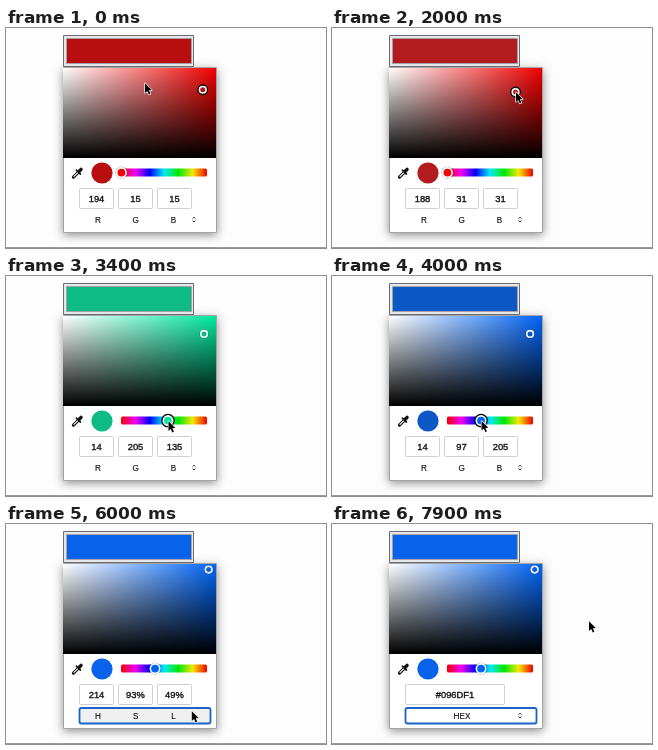
Write an HTML page with a canvas that moves like this. It is 320 by 220 pixels and loops after 8000 ms.

```html
<!DOCTYPE html>
<html lang="en">
<head>
<meta charset="utf-8">
<title>Colour picker</title>
<style>
html, body { margin: 0; width: 100%; height: 100%; overflow: hidden; background: #fdfdfd; }
canvas { display: block; width: 320px; height: 220px; }
</style>
</head>
<body>
<canvas id="stage" width="320" height="220"></canvas>
<script>
const ctx = document.getElementById('stage').getContext('2d');
const LOOP = 8000, STEP = 100;
const FONT = '"Liberation Sans", Arial, sans-serif';
const INK = '#111';
const AREA = { x: 57, y: 40, w: 153, h: 90 };
const BAR = { x: 115, y: 140.5, w: 86, h: 8 };
const SPOT = { x: 60.2, y: 40.7, w: 148, h: 88 };
const KNOB = { x: 115.4, y: 144.6, w: 83 };
const RED_HUE = 360, BLUE_HUE = 214.08;

// A colour's place in the shade area, from its highest and lowest channel
const spot = (max, min) => [SPOT.x + SPOT.w * (1 - min / max), SPOT.y + SPOT.h * (1 - max / 255)];
const hueToX = h => KNOB.x + KNOB.w * (1 - h / 360);
const xToHue = x => 360 * (1 - (x - KNOB.x) / KNOB.w);

const start = [138.5, 55], red = spot(194, 15), dull = spot(124, 65);
const deep = spot(205, 14), bright = spot(241, 9);
const onBar = [138.3, 144.6], blue = [hueToX(BLUE_HUE), 144.6];
const menu = [185.3, 187], rest = [256.5, 97];

// Pointer path: [time, point]
const path = [
  [0, start], [300, start], [1300, dull], [2300, deep], [2400, deep],
  [2800, onBar], [2900, onBar], [3400, [162, 145]], [3900, blue], [4100, blue],
  [4500, [221, 56]], [4900, bright], [5200, [151, 154]],
  [5700, menu], [6800, menu], [7400, [273, 140]], [7900, rest]
];

function pointerAt(t) {
  const i = path.findIndex(([time]) => time > t);
  if (i < 0) return rest;
  const [t0, a] = path[i - 1], [t1, b] = path[i];
  const u = (t - t0) / (t1 - t0);
  const e = u * u * (3 - 2 * u);
  return a.map((v, j) => v + (b[j] - v) * e);
}

// The ring and the hue knob follow the pointer while it is held down
function ringAt(t) {
  if (t < 100) return red;
  return pointerAt(t < 4700 ? Math.min(t, 2300) : Math.min(t, 4900));
}
const hueAt = t => t < 2900 ? RED_HUE : xToHue(pointerAt(Math.min(t, 3900))[0]);

function hsv(h, s, v) {
  return [5, 3, 1].map(n => {
    const k = (n + h / 60) % 6;
    return Math.round(255 * v * (1 - s * Math.max(0, Math.min(k, 4 - k, 1))));
  });
}

// The screen shows colours a little duller than their values
const shown = ([r, g, b]) => `rgb(${r * 0.95},${g * 0.91},${b * 0.97})`;
const pure = h => shown(hsv(h, 1, 1));

function hsl([r, g, b], h) {
  const max = Math.max(r, g, b), min = Math.min(r, g, b), sum = max + min;
  const sat = (max - min) / (sum > 255 ? 510 - sum : sum || 1);
  return [Math.round(h % 360), Math.round(sat * 100) + '%', Math.round(sum / 5.1) + '%'];
}
const hex = c => '#' + c.map(n => n.toString(16).padStart(2, '0')).join('').toUpperCase();

function rect(x, y, w, h, fill) {
  ctx.fillStyle = fill;
  ctx.fillRect(x, y, w, h);
}

function frame(x, y, w, h, r, fill, line, width = 1) {
  ctx.beginPath();
  ctx.roundRect(x, y, w, h, r);
  ctx.fillStyle = fill;
  ctx.fill();
  ctx.strokeStyle = line;
  ctx.lineWidth = width;
  ctx.stroke();
}

function disc(x, y, r, fill) {
  ctx.beginPath();
  ctx.arc(x, y, r, 0, 2 * Math.PI);
  ctx.fillStyle = fill;
  ctx.fill();
}

function stroke(points, color, width) {
  ctx.beginPath();
  points.forEach(([x, y]) => ctx.lineTo(x, y));
  ctx.strokeStyle = color;
  ctx.lineWidth = width;
  ctx.stroke();
}

function label(text, x, y, size, weight) {
  ctx.font = `${size}px ${FONT}`;
  ctx.textAlign = 'center';
  ctx.fillStyle = ctx.strokeStyle = INK;
  ctx.lineWidth = weight;
  ctx.fillText(text, x, y);
  ctx.strokeText(text, x, y);
}
const valueText = (text, x) => label(text, x, 174, 9.4, 0.35);
const modeText = (text, x) => label(text, x, 194.6, 8.2, 0.12);

function gradient(x0, y0, x1, y1, stops) {
  const g = ctx.createLinearGradient(x0, y0, x1, y1);
  stops.forEach((c, i) => g.addColorStop(i / (stops.length - 1), c));
  return g;
}

function handle(x, y, r, fill, focused) {
  if (focused) disc(x, y, r + 1.3, '#000');
  else disc(x, y, r + 0.6, 'rgba(0,0,0,0.25)');
  disc(x, y, r, '#fff');
  disc(x, y, r - 1.6, fill);
}

function swatchButton(color) {
  frame(57.5, 7.5, 130, 31, 0, '#e6e6e9', '#6c6c74');
  frame(60.5, 10.5, 125, 25, 0, color, '#a2a2a7');
}

function popup() {
  ctx.save();
  ctx.shadowColor = 'rgba(0,0,0,0.45)';
  ctx.shadowBlur = 9;
  ctx.shadowOffsetY = 2;
  rect(57, 40, 154, 165, '#fff');
  ctx.restore();
  frame(57.5, 39.5, 153, 165, 0, '#fff', '#a4a4a4');
}

function shades(h) {
  const { x, y, w, h: height } = AREA;
  rect(x, y, w, height, gradient(x, 0, x + w, 0, ['#fff', pure(h)]));
  rect(x, y, w, height, gradient(0, y, 0, y + height, ['rgba(0,0,0,0)', '#000']));
}

function hueBar() {
  const stops = Array.from({ length: 7 }, (_, i) => pure(360 - 60 * i));
  ctx.beginPath();
  ctx.roundRect(BAR.x, BAR.y, BAR.w, BAR.h, 1.5);
  ctx.fillStyle = gradient(BAR.x, 0, BAR.x + BAR.w, 0, stops);
  ctx.fill();
}

function dropper() {
  ctx.save();
  ctx.translate(71, 145.5);
  ctx.rotate(-Math.PI / 4);
  ctx.lineCap = 'round';
  stroke([[-5, 0], [2, 0]], INK, 3.2);
  stroke([[-4.2, 0], [1.5, 0]], '#fff', 1.1);
  stroke([[2, -2.8], [2, 2.8]], INK, 1.6);
  stroke([[3.2, 0], [5.8, 0]], INK, 3.4);
  ctx.restore();
}

function field(x, w, text) {
  frame(x, 160.5, w, 20, 1, '#fff', '#d0d0d0');
  valueText(text, x + w / 2);
}

function fields(mode, color, h) {
  if (mode === 'HEX') return field(73.5, 99, hex(color));
  const values = mode === 'RGB' ? color : hsl(color, h);
  values.forEach((v, i) => field(73.5 + 39 * i, 34, v));
}

function modeRow(mode, focused, hover) {
  if (focused) frame(73.5, 184, 131, 15.5, 2, hover ? '#f0f0f0' : '#fff', '#1b62c9', 1.8);
  if (mode === 'HEX') modeText(mode, 130);
  else [...mode].forEach((c, i) => modeText(c, 92 + 37.8 * i));
  for (const dir of [-1, 1]) {
    const y = 191.6 + dir;
    stroke([[186.7, y], [188, y + 1.4 * dir], [189.3, y]], '#222', 1);
  }
}

function pointer(x, y) {
  ctx.save();
  ctx.translate(x + 0.5, y + 0.3);
  ctx.lineJoin = 'round';
  const arrow = new Path2D('M0 0V9.6L2.2 7.6L3.8 11.2L5.4 10.5L3.9 7L6.8 6.8Z');
  ctx.strokeStyle = '#fff';
  ctx.lineWidth = 1.3;
  ctx.stroke(arrow);
  ctx.fillStyle = '#000';
  ctx.fill(arrow);
  ctx.restore();
}

function draw(t) {
  const [rx, ry] = ringAt(t);
  const h = hueAt(t);
  const [px, py] = pointerAt(t);
  const color = hsv(h, (rx - SPOT.x) / SPOT.w, 1 - (ry - SPOT.y) / SPOT.h);
  const mode = t < 5800 ? 'RGB' : t < 6700 ? 'HSL' : 'HEX';
  const focus = t < 2900 ? 'shade' : t < 4700 ? 'hue' : t < 5800 ? 'shade' : 'mode';
  const hover = px > 73 && px < 205 && py > 184 && py < 200;

  rect(0, 0, 320, 220, '#fdfdfd');
  rect(0, 219, 320, 1, '#999');
  popup();
  swatchButton(shown(color));
  shades(h);
  handle(rx, ry, 4.1, shown(color), focus === 'shade');
  dropper();
  disc(96, 145, 10.6, shown(color));
  hueBar();
  handle(hueToX(h), KNOB.y, 5.5, pure(h), focus === 'hue');
  fields(mode, color, h);
  modeRow(mode, focus === 'mode', hover);
  pointer(px, py);
}

function tick() {
  const t = performance.now() % LOOP;
  draw(Math.floor(t / STEP) * STEP);
  requestAnimationFrame(tick);
}
tick();
</script>
</body>
</html>
```
